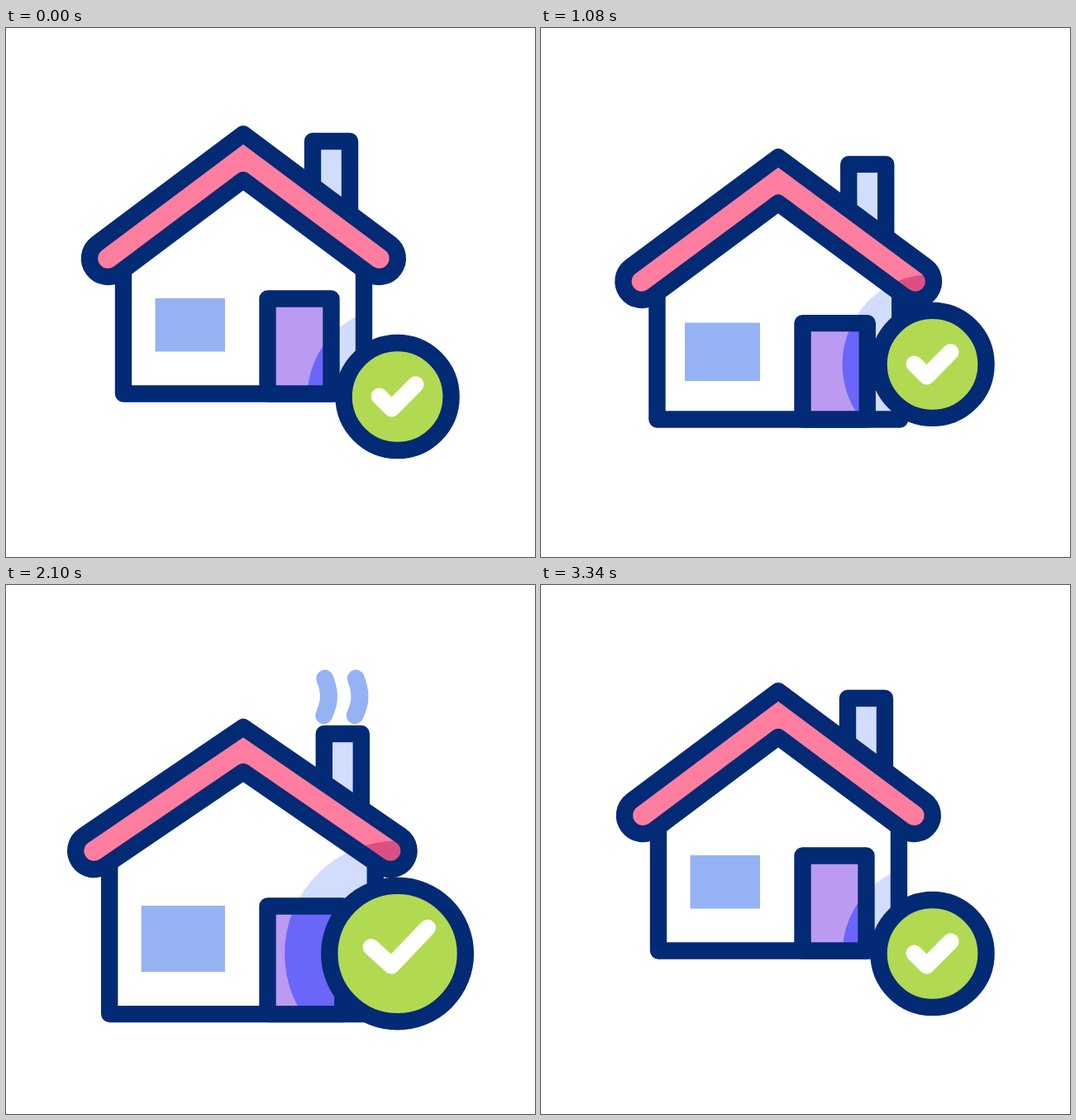
Write an HTML page with a canvas that moves like this. It is 640x640 px and loops after 3600 ms.

```html
<!DOCTYPE html>
<html>
<head>
<meta charset="utf-8">
<style>
html, body { margin: 0; width: 100%; height: 100%; overflow: hidden; background: #fff; }
canvas { display: block; }
</style>
</head>
<body>
<canvas id="stage" width="640" height="640"></canvas>
<script>
const LOOP = 3600;
const NAVY = '#032a75', PINK = '#ff7e9f', ROSE = '#db4f85', PALE = '#d2dcfd',
      BLUE = '#95b2f4', LILAC = '#bb9af2', VIOLET = '#6b66fa', GREEN = '#b1da52';
const ctx = document.getElementById('stage').getContext('2d');
ctx.lineJoin = ctx.lineCap = 'round';

const clamp = v => Math.min(1, Math.max(0, v));
const ramp = (t, from, to) => clamp((t - from) / (to - from));

// Progress along cubic-bezier(x1, 0, x2, 1) between two times
function ease(t, from, to, x1 = 0.3, x2 = 0.3) {
  const u = ramp(t, from, to);
  let lo = 0, hi = 1;
  for (let i = 0; i < 24; i++) {
    const s = (lo + hi) / 2, r = 1 - s;
    if (3 * r * r * s * x1 + 3 * r * s * s * x2 + s ** 3 < u) lo = s; else hi = s;
  }
  return lo * lo * (3 - 2 * lo);
}

function poly(points, closed) {
  const p = new Path2D();
  points.forEach(([x, y]) => p.lineTo(x, y));
  if (closed) p.closePath();
  return p;
}

function disc(x, y, r) {
  const p = new Path2D();
  p.arc(x, y, r, 0, 2 * Math.PI);
  return p;
}

function fill(path, color) {
  ctx.fillStyle = color;
  ctx.fill(path);
}

function stroke(path, color = NAVY, width = 20.4) {
  ctx.strokeStyle = color;
  ctx.lineWidth = width;
  ctx.stroke(path);
}

function shaded(path, color, dark, shadow) {
  fill(path, color);
  ctx.save();
  ctx.clip(shadow);
  fill(path, dark);
  ctx.restore();
}

// Gable band of constant thickness with round ends
function roofPath(left, right, peak, end) {
  const r = 22.3, x = 287, p = new Path2D();
  const al = Math.atan2(end - peak, x - left), ar = Math.atan2(end - peak, right - x);
  const gap = r / Math.cos((al + ar) / 2);
  p.moveTo(x, peak - gap);
  p.arc(right, end, r, ar - Math.PI / 2, ar + Math.PI / 2);
  p.lineTo(x, peak + gap);
  p.arc(left, end, r, Math.PI / 2 - al, 1.5 * Math.PI - al);
  p.closePath();
  return p;
}

function drawSmoke(t, start, dx, dy) {
  const length = 92;
  const head = length * ramp(t, start, start + 420);
  const tail = length * ramp(t, start + 210, start + 490);
  if (head - tail < 0.5) return;
  const p = new Path2D('M384.5 158C391 144 393 133 386.5 115C380 99 380 90 388 76');
  ctx.save();
  ctx.setLineDash([head - tail, 999]);
  ctx.lineDashOffset = -tail;
  ctx.translate(dx, dy);
  stroke(p, BLUE, 21);
  ctx.translate(37.5, 0);
  stroke(p, BLUE, 21);
  ctx.restore();
}

function drawHouse(t, shadow) {
  const rise = ease(t, 205, 755), fall = ease(t, 755, 1450), back = ease(t, 2822, 3348);
  const shrink = ease(t, 2100, 2670);
  const grow = ease(t, 885, 1500, 0.7, 0.6) - shrink;
  const pane = ease(t, 880, 1560) - shrink;
  const y = -43 * rise + 103 * fall - 60 * back;
  const top = y - 17 * grow, mid = y + grow, base = 442.5 + y + 16.6 * grow;
  const dl = -16.8 * grow, dr = 13.8 * grow;

  for (const start of [1400, 1890]) drawSmoke(t, start, dr - 13.8, top - 43);

  const chimney = poly([[371 + dr, 190 + top], [371 + dr, 137 + top],
                        [416 + dr, 137 + top], [416 + dr, 223 + top]]);
  fill(chimney, PALE);
  stroke(chimney);

  const l = 142 + dl, r = 433 + dr, eave = 287 + top;
  shaded(poly([[l, base], [l, eave], [287, 184 + top], [r, eave], [r, base]], true),
    '#fff', PALE, shadow);
  stroke(poly([[l, eave], [l, base], [r, base], [r, eave]]));

  ctx.fillStyle = BLUE;
  ctx.fillRect(180.5 - 16.8 * pane, 327 + mid, 84.5 + 16.8 * pane, 64.5 + 15.5 * pane);

  const door = poly([[316.5, base], [316.5, 327.5 + mid],
                     [393.5 + dr, 327.5 + mid], [393.5 + dr, base]], true);
  shaded(door, LILAC, VIOLET, shadow);
  stroke(door);

  const roof = roofPath(123.3 + dl, 451.5 + dr, 156 + top, 278.7 + top);
  shaded(roof, PINK, ROSE, shadow);
  stroke(roof);
}

function drawBadge(x, y, size) {
  const circle = disc(x, y, 65 + 17.3 * size);
  fill(circle, GREEN);
  stroke(circle);
  stroke(poly([[x - 22 - 10 * size, y - 0.5 - 7.5 * size],
               [x - 7 - 0.3 * size, y + 14.5],
               [x + 22 + 14.5 * size, y - 14.8 - 16.5 * size]]), '#fff', 20);
}

function frame(now) {
  const t = now % LOOP;
  const x = 473.6, y = 446 - 82 * (ease(t, 205, 755) - ease(t, 872, 1450));
  const size = ease(t, 1400, 1860) - ease(t, 2280, 2830);
  ctx.clearRect(0, 0, 640, 640);
  drawHouse(t, disc(x, y, 109 + 27.5 * size));
  drawBadge(x, y, size);
}

const begin = performance.now();
function tick() {
  frame(performance.now() - begin);
  requestAnimationFrame(tick);
}
tick();
</script>
</body>
</html>
```
